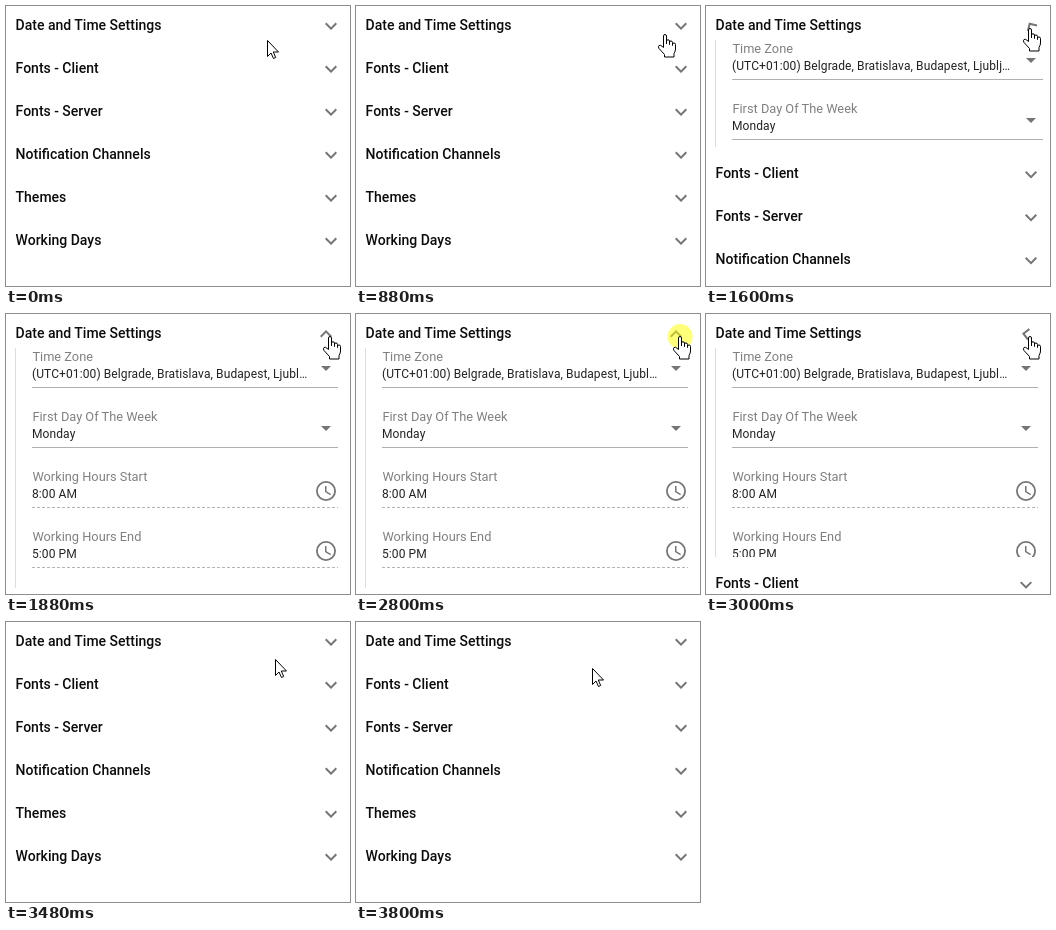
Animation, 344 px wide and 280 px high, one loop 4160 ms. Source, as an HTML page:

```html
<!DOCTYPE html>
<html lang="en">
<head>
<meta charset="utf-8">
<title>Settings accordion</title>
<style>
html, body { margin: 0; width: 100%; height: 100%; overflow: hidden; background: #fff; }
svg { display: block; font-family: Roboto, sans-serif; }
.title { font-size: 14px; font-weight: 500; fill: #0c0c0c; }
.label { font-size: 12.8px; fill: #808080; }
.value { font-size: 12px; letter-spacing: .1px; fill: #222; }
.icon { fill: #757575; }
.line { stroke: #b0b0b0; }
.dashed { stroke: #b4b4b4; stroke-dasharray: 3 2; }
#cursor path { fill: #fff; stroke: #000; }
#glow { fill: #ff0; opacity: .53; }
</style>
</head>
<body>
<svg id="stage" width="344" height="280" viewBox="0 0 344 280">
  <clipPath id="clip"><rect id="window" y="34" width="344"/></clipPath>
  <g id="rows"></g>
  <g id="panel" clip-path="url(#clip)">
    <path d="M9.5 34V274" stroke="#ddd"/>
  </g>
  <circle id="glow" cx="324" cy="22.5" r="12.5"/>
  <g id="cursor">
    <path id="arrow" d="M.5.5V16.5L4 13l2.5 5.5 2.2-1L6.3 12H11.5z"/>
    <path id="hand" stroke-linejoin="round" d="M5.5 13.5V2q0-1.5 1.5-1.5T8.5 2v8V7q0-1.2 1.5-1.2T11.5 7v3.5V8q0-1 1.5-1T14.5 8.5v3V10q0-1 1.5-1T17.5 10.5V15q0 2-1.5 4.5v3.5h-9.500V20.500L1 14.5Q-.2 12.5 1 11.5q1.5-.8 3 .8z"/>
  </g>
</svg>
<script>
const LOOP = 4160, OPEN_HEIGHT = 240, SCROLLBAR = 5;
const $ = id => document.getElementById(id);
const CHEVRON = 'M16.59 8.59L12 13.17 7.41 8.59 6 10l6 6 6-6z';
const DROPDOWN = 'M7 10l5 5 5-5z';
const CLOCK = 'M12 2a10 10 0 1 0 0 20 10 10 0 0 0 0-20zm0 18.2a8.2 8.2 0 1 1 0-16.4 8.2 8.2 0 0 1 0 16.4z' +
  'M12.5 7H11v6l5.25 3.15.75-1.23-4.5-2.67z';
const ZONE = '(UTC+01:00) Belgrade, Bratislava, Budapest, Ljubl';

function add(parent, tag, attrs, text = '') {
  const el = document.createElementNS('http://www.w3.org/2000/svg', tag);
  for (const key in attrs) el.setAttribute(key, attrs[key]);
  el.textContent = text;
  return parent.appendChild(el);
}
const move = (el, x, y, extra = '') => el.setAttribute('transform', `translate(${x} ${y}) ${extra}`);
const show = (el, on) => el.setAttribute('visibility', on ? 'visible' : 'hidden');

const rows = ['Date and Time Settings', 'Fonts - Client', 'Fonts - Server',
  'Notification Channels', 'Themes', 'Working Days'].map(name => ({
  title: add($('rows'), 'text', { class: 'title', x: 9.6 }, name),
  chevron: add($('rows'), 'path', { class: 'icon', d: CHEVRON })
}));

const fields = [
  ['Time Zone', ZONE], ['First Day Of The Week', 'Monday'],
  ['Working Hours Start', '8:00 AM'], ['Working Hours End', '5:00 PM']
].map(([label, text], i) => {
  const isList = i < 2;
  const g = add($('panel'), 'g', { transform: `translate(0 ${i * 60})` });
  add(g, 'text', { class: 'label', x: 26.4, y: 47 }, label);
  const value = add(g, 'text', { class: 'value', x: 26, y: 64 }, text);
  const line = add(g, 'path', { class: isList ? 'line' : 'dashed' });
  const icon = add(g, 'path', { class: 'icon', d: isList ? DROPDOWN : CLOCK });
  return { value, line, icon, iconY: isList ? 42 : 45 };
});

// Pointer path: time, x, y
const path = [
  [0, 261, 34], [480, 261, 34], [600, 271, 37], [720, 287, 38], [800, 298, 34],
  [880, 308, 28], [1000, 318, 24], [1067, 318, 24], [1200, 323, 22], [3000, 323, 22],
  [3120, 315, 22], [3320, 298, 28], [3480, 269, 37], [3520, 262, 40],
  [3600, 250, 44], [3800, 236, 46], [LOOP, 236, 46]
];
function pointer(t) {
  const i = path.findIndex(p => p[0] > t);
  const [t0, x0, y0] = path[i - 1], [t1, x1, y1] = path[i];
  const k = (t - t0) / (t1 - t0);
  return [Math.round(x0 + (x1 - x0) * k), Math.round(y0 + (y1 - y0) * k)];
}

// cubic-bezier(.4, 0, .2, 1)
function ease(x) {
  if (x <= 0) return 0;
  if (x >= 1) return 1;
  let lo = 0, hi = 1;
  for (let i = 0; i < 20; i++) {
    const s = (lo + hi) / 2, r = 1 - s;
    if (1.2 * r * r * s + .6 * r * s * s + s * s * s < x) lo = s; else hi = s;
  }
  return lo * lo * (3 - 2 * lo);
}
const opened = (t, ms) => ease((t - 1502) / ms) - ease((t - 2940) / ms);

// 15 steps a second, rounded to multiples of 40 ms
function snap(t) {
  const r = t % 200;
  return t - r + (r < 80 ? 0 : r < 120 ? 80 : 120);
}

function draw(now) {
  const t = snap(now % LOOP);
  const height = OPEN_HEIGHT * opened(t, 300);
  const narrow = t >= 1880 && t < 3080;
  const dx = narrow ? -SCROLLBAR : 0;

  // Text sits on whole pixels, icons do not
  rows.forEach(({ title, chevron }, i) => {
    const y = i * 43 + (i && height);
    title.setAttribute('y', 24 + Math.floor(y));
    move(chevron, 313 + dx, 8 + y, i ? '' : `rotate(${180 * opened(t, 180)} 12 12)`);
  });

  $('window').setAttribute('height', height && Math.round(height) + 1);
  for (const { line, icon, iconY } of fields) {
    line.setAttribute('d', `M26 73.5H${337 + dx}`);
    move(icon, 313 + dx, iconY);
  }
  fields[0].value.textContent = ZONE + (narrow ? '…' : 'j…');

  const [x, y] = pointer(t), hand = x > 302;
  show($('arrow'), !hand);
  show($('hand'), hand);
  move($('cursor'), x - (hand ? 6 : 0), y);
  show($('glow'), t >= 1400 && t < 1500 || t >= 2800 && t < 2930);
}

(function tick() {
  draw(performance.now());
  requestAnimationFrame(tick);
})();
</script>
</body>
</html>
```
